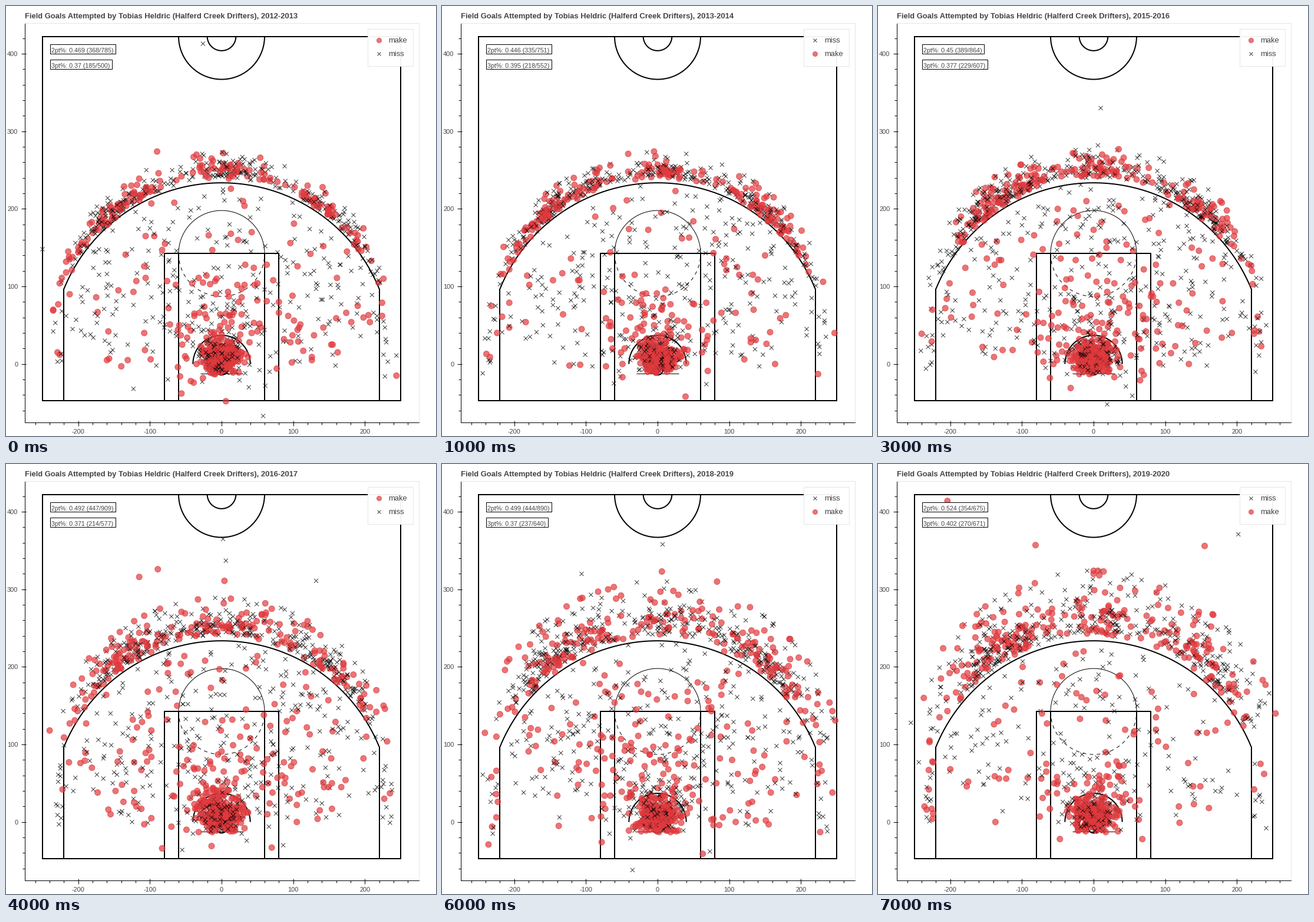
Recreate the animation shown at these times as a matplotlib script. Size 730 px wide and 730 px high, loop 9000 ms.

```python
import numpy as np
import matplotlib.pyplot as plt
from matplotlib.animation import FuncAnimation
from matplotlib.collections import PathCollection
from matplotlib.patches import Rectangle
from matplotlib.path import Path
from matplotlib.transforms import Affine2D, IdentityTransform

SIZE, DPI = 730, 100
PT = 72 / DPI                                   # points per pixel
LEFT, RIGHT, TOP, BOTTOM = 31.5, 700.5, 28.5, 706.5
XLIM, YLIM = (-275, 275), (-75, 440)
SX = (RIGHT - LEFT) / (XLIM[1] - XLIM[0])
SY = (BOTTOM - TOP) / (YLIM[1] - YLIM[0])
GREY, PALE = "#444444", "#e5e5e5"
RED, BLACK, CLEAR = "#e03a3eb3", "#000000bf", "none"
TITLE = "Field Goals Attempted by Tobias Heldric (Halferd Creek Drifters), {}-{}"

plt.rcParams.update({"font.family": "Liberation Sans", "axes.unicode_minus": False})

# 2pt made/tried, 3pt made/tried, share of threes straight ahead
SEASONS = [
    (368, 785, 185, 500, .25),
    (335, 751, 218, 552, .20),
    (394, 788, 196, 570, .14),
    (389, 864, 229, 607, .20),
    (447, 909, 214, 577, .25),
    (394, 786, 227, 629, .17),
    (444, 890, 237, 640, .21),
    (354, 675, 270, 671, .16),
]

# lone shots far from the crowd: made, then missed
LONE = [
    ([(-90, 274)], [(-26, 413), (-250, 148), (-123, -32)]),
    ([(247, 40)], []),
    ([(75, 302), (168, 260)], [(-152, 323), (-34, 328)]),
    ([], [(10, 330)]),
    ([(-89, 326), (-115, 316), (4, 311)], [(2, 365), (6, 337), (132, 311)]),
    ([(71, 305)], [(-93, 330), (-13, 324), (37, 320)]),
    ([(6, 323), (83, 310), (-236, -29)], [(7, 358), (-106, 320)]),
    ([(-204, 414), (-81, 357), (155, 356)], [(202, 371)]),
]


def polar(deg, r):
    a = np.radians(deg)
    return np.column_stack([r * np.sin(a), r * np.cos(a)])


def two_pointers(rng, n, last):
    rim = int(n * (.58 if last else .48))
    short = n // 6
    mid = n // 9 if last else n // 6
    rest = n - rim - short - mid
    y = rng.normal(8, 10, rim)
    near = np.column_stack([rng.normal(0, 13, rim), np.where(y < -13, -26 - y, y)])
    floaters = polar(rng.normal(0, 52, short), 30 + 62 * rng.random(short) ** 1.2)
    middle = polar(rng.uniform(-92, 92, mid), rng.uniform(90, 165, mid))
    deep = polar(rng.uniform(-80, 80, rest), rng.uniform(160, 232, rest))
    pts = np.vstack([near, floaters, middle, deep])
    pts[:, 0] = np.clip(pts[:, 0], -217, 217)
    return pts


def three_pointers(rng, n, i, ahead):
    side = int(n * (.13 if i == 2 else .045))
    x = 222 + np.minimum(np.abs(rng.normal(0, 9, side)), 22)
    corners = np.column_stack([x * rng.choice([-1, 1], side),
                               rng.uniform(-16, 80, side)])
    n -= side
    wing = 36 - i / 2
    left = .55 * (1 - ahead)
    pick = rng.choice([0, -1, 1], n, p=[ahead, left, 1 - ahead - left])
    deg = 2 + wing * pick + rng.normal(0, 1, n) * np.where(pick, 13, 7)
    deg = np.where(np.abs(deg) > 66, np.sign(deg) * (132 - np.abs(deg)), deg)
    depth = 6.5 + i * i / 5                     # shots drift back every year
    back = np.minimum(rng.gamma(2, depth, n), 5.2 * depth)
    arc = polar(deg, 239 + back * np.cos(np.radians(deg)) ** 0.7)
    return np.vstack([corners, arc])


def best(score, count):
    made = np.zeros(len(score), bool)
    made[np.argsort(-score)[:count]] = True
    return made


def season_shots(i):
    """Positions and results of every shot in one season."""
    rng = np.random.default_rng(2012 + i)
    m2, a2, m3, a3, ahead = SEASONS[i]
    hit, miss = LONE[i]
    lone = np.array(hit + miss, float)
    twos = two_pointers(rng, a2, i == len(SEASONS) - 1)
    threes = three_pointers(rng, a3 - len(lone), i, ahead)
    made2 = best(rng.random(a2) - 0.0018 * np.hypot(*twos.T), m2)
    made3 = best(rng.random(len(threes)), m3 - len(hit))
    pts = np.vstack([twos, threes, lone]).round()
    made = np.concatenate([made2, made3, np.arange(len(lone)) < len(hit)])
    order = rng.permutation(len(pts))
    return pts[order], made[order]


def cross(r):
    return Path([(-r, -r), (r, r), (-r, r), (r, -r)],
                [Path.MOVETO, Path.LINETO, Path.MOVETO, Path.LINETO])


def style(coll, made, dot, ex):
    coll.set_paths([dot if m else ex for m in made])
    coll.set_facecolor([RED if m else CLEAR for m in made])
    coll.set_edgecolor([RED if m else BLACK for m in made])


fig = plt.figure(figsize=(SIZE / DPI, SIZE / DPI), dpi=DPI, facecolor="white")
ax = fig.add_axes([LEFT / SIZE, 1 - BOTTOM / SIZE,
                   (RIGHT - LEFT) / SIZE, (BOTTOM - TOP) / SIZE])
PX = Affine2D().scale(1 / SIZE, -1 / SIZE).translate(0, 1) + fig.transFigure


def text(x, y, s, px, **kw):
    return fig.text(x, y, s, fontsize=px * PT, color=GREY, transform=PX,
                    va="baseline", **kw)


def box(x, y, w, h, edge, fill="white"):
    patch = Rectangle((x, y), w, h, facecolor=fill, edgecolor=edge,
                      lw=PT, transform=PX, zorder=2)
    return fig.add_artist(patch)


def line(xs, ys, px=2, **kw):
    ax.plot(xs, ys, color="black", lw=px * PT, solid_capstyle="butt",
            solid_joinstyle="miter", zorder=1, **kw)


def arc(cy, r, start, end, px=2, **kw):
    t = np.radians(np.linspace(start, end, 120))
    line(r * np.cos(t), cy + r * SX / SY * np.sin(t), px, **kw)


def draw_axes():
    ax.set(xlim=XLIM, ylim=YLIM)
    xs, ys = np.arange(-200, 201, 100), np.arange(0, 401, 100)
    ax.set_xticks(xs)
    ax.set_yticks(ys)
    ax.set_xticks(np.arange(-260, 261, 20), minor=True)
    ax.set_yticks(np.arange(-60, 421, 20), minor=True)
    ax.tick_params(length=6 * PT, width=PT, pad=5 * PT, labelsize=11 * PT,
                   labelcolor=GREY)
    ax.tick_params(which="minor", length=4 * PT, width=PT)
    ax.vlines(xs, YLIM[0], YLIM[0] + 2.5 / SY, color="black", lw=PT)
    ax.hlines(ys, XLIM[0], XLIM[0] + 2.5 / SX, color="black", lw=PT)
    for name, spine in ax.spines.items():
        spine.set_linewidth(PT)
        spine.set_edgecolor("black" if name in ("left", "bottom") else PALE)


def draw_court():
    base, top, key = -47.5, 422.5, 142.5
    for half, height in ((250, top), (80, key)):
        line([-half, half, half, -half, -half, half],
             [base, base, height, height, base, base])
    for sign in (-1, 1):
        line([60 * sign] * 2, [base, key])
        line([220 * sign] * 2, [base, 97])
    arc(top, 60, 180, 360)
    arc(top, 20, 180, 360)
    arc(0, 40, 0, 180)
    arc(key, 60, 0, 180, 1)
    arc(key, 60, 180, 360, 1, linestyle=(0, (6, 6)))
    edge = np.degrees(np.arccos(220 / 237.5))
    arc(14.2, 237.5, edge, 180 - edge)
    arc(-7.3, 7.5, 0, 360)
    line([-30, 30], [-12.5, -12.5], 1)


draw_axes()
draw_court()

DOT, EX = Path.circle(radius=5), cross(3.5)
KEY_DOT, KEY_EX = Path.circle(radius=4), cross(3)
shots = PathCollection([DOT], offsets=[(0, 0)], offset_transform=ax.transData,
                       transform=IdentityTransform(), linewidths=PT, zorder=2)
ax.add_collection(shots, autolim=False)

title = text(31.5, 21, "", 13, weight="bold")
rates = [(box(74.5, y, 112, 16.5, "black"), text(77, y + 14.5, "", 32 / 3))
         for y in (64.5, 90.5)]

box(613.5, 38.5, 77, 63, PALE, "#fffffff2")
names = [text(649, y, "", 13) for y in (62, 85)]
keys = PathCollection([KEY_DOT], offsets=[(633.5, 58.5), (633.5, 81.5)],
                      offset_transform=PX, transform=IdentityTransform(),
                      linewidths=PT, zorder=3)
fig.add_artist(keys)

DATA = [season_shots(i) for i in range(len(SEASONS))]
MAKE_FIRST = (0, 3, 4)


def update(step):
    i = min(step, len(SEASONS) - 1)
    pts, made = DATA[i]
    shots.set_offsets(pts)
    style(shots, made, DOT, EX)
    title.set_text(TITLE.format(2012 + i, 2013 + i))

    m2, a2, m3, a3 = SEASONS[i][:4]
    for (frame, label), n, m, a in zip(rates, (2, 3), (m2, m3), (a2, a3)):
        s = f"{n}pt%: {round(m / a, 3)} ({m}/{a})"
        label.set_text(s)
        frame.set_width(5.93 * len(s) - 13)

    order = [True, False] if i in MAKE_FIRST else [False, True]
    style(keys, order, KEY_DOT, KEY_EX)
    for label, is_make in zip(names, order):
        label.set_text("make" if is_make else "miss")
    return [shots, keys, title]


anim = FuncAnimation(fig, update, frames=9, interval=1000, repeat=True,
                     repeat_delay=0, blit=False)
plt.show()
```
